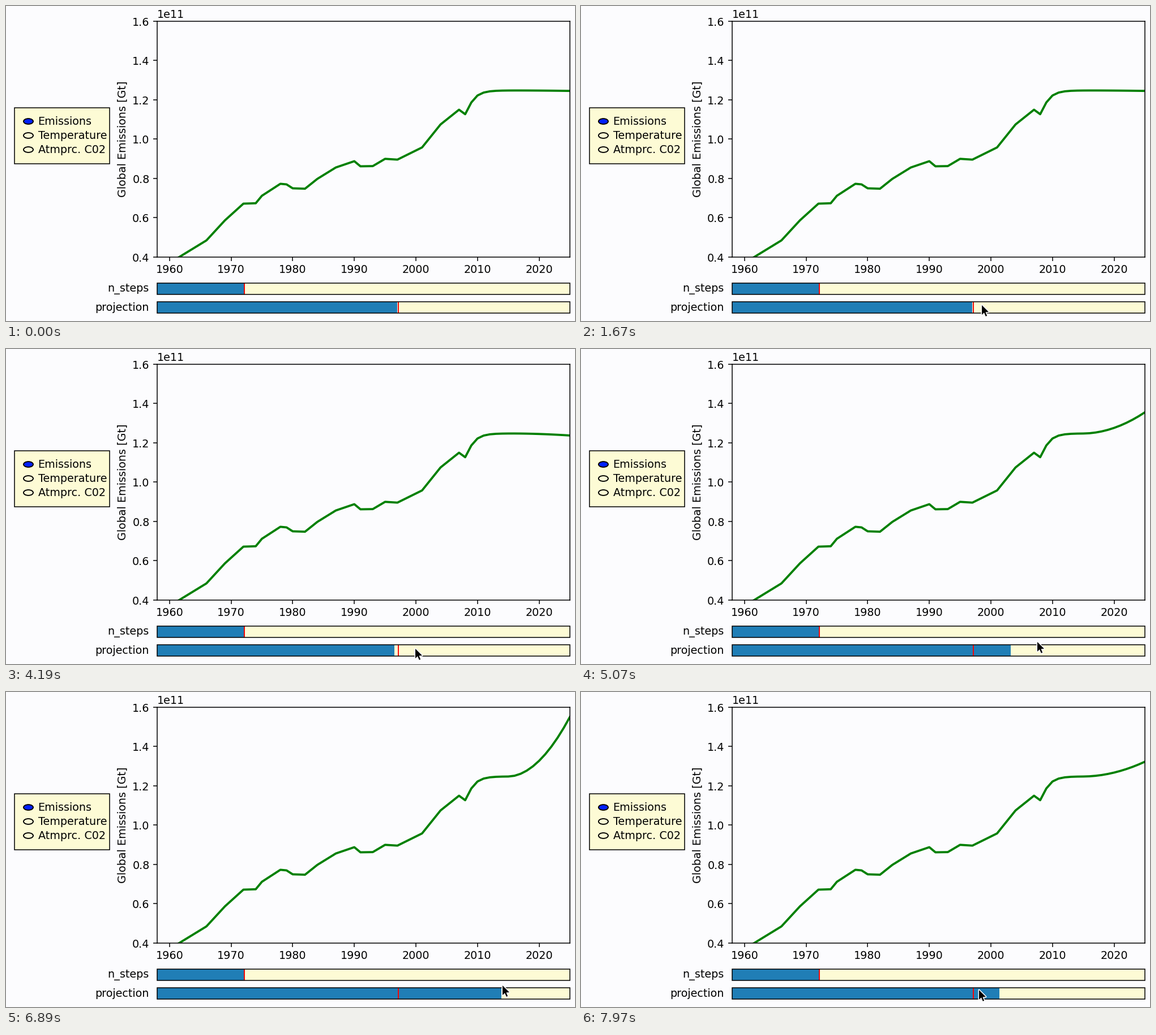
These frames come from a looping animation (1005x557 px, 7990 ms). A matplotlib script:

```python
import numpy as np
import matplotlib.pyplot as plt
from matplotlib.animation import FuncAnimation
from matplotlib.patches import Ellipse, Polygon, Rectangle

W, H, DPI = 1005, 557, 138
PX = 72 / DPI                      # points per pixel
LOOP, STEP = 7990, 34
BG, CREAM, BLUE = "#fcfcfe", "#fdfbd5", "#207eb6"
LEFT, RIGHT, TOP, BOTTOM = 267, 996, 27, 444
MARK, START_FILL, GRAB = 692.5, 691, 3400
LAG = 110                          # the bar trails the pointer
PLATEAU = 1.248

plt.rcParams.update({"font.family": "DejaVu Sans", "font.size": 10})

# turning points of the emissions, in units of 1e11
TURNS = [(1960, .37), (1966, .485), (1969, .587), (1972, .672), (1974, .674),
         (1975, .712), (1978, .773), (1979, .77), (1980, .75), (1982, .748),
         (1984, .798), (1987, .856), (1990, .888), (1991, .862), (1993, .863),
         (1995, .9), (1997, .896), (2001, .958), (2004, 1.075), (2007, 1.15),
         (2008, 1.127)]
# pointer stops: time, x, y
STOPS = [(400, 815, 562), (1670, 707, 527), (2930, 685, 530),
         (4080, 686, 531), (4190, 722, 528), (4960, 759, 519),
         (5070, 805, 516), (5400, 868, 517), (6890, 876, 517),
         (7450, 877, 530), (7970, 702, 525)]
ARROW = np.array([(0, 0), (0, 17), (4, 13.2), (6.8, 19.8),
                  (9.2, 18.8), (6.5, 12.4), (12, 12)]) + (1, 2)

YEARS = np.arange(1960, 2026)
HISTORY = np.where(YEARS < 2009, np.interp(YEARS, *zip(*TURNS)),
                   PLATEAU - 0.061 * 0.42 ** np.maximum(YEARS - 2009.0, 0))
AHEAD = np.clip((YEARS - 2015) / 10, 0, 1)


def pointer(t):
    times, xs, ys = zip(*STOPS)
    return np.array([np.interp(t, times, xs), np.interp(t, times, ys)])


def fill_end(t):
    return START_FILL if t < GRAB else pointer(t - LAG)[0]


def emissions(fill):
    """History plus a projection that bends with the slider."""
    d = fill - MARK
    rise = (0.555 * d + 0.000112 * d * d) * 1.2 / (BOTTOM - TOP)
    return (HISTORY + rise * AHEAD ** 1.93) * 1e11


def hold(t):
    """Screen updates come in a 20, 20, 100 ms rhythm."""
    phase = (t - 830) % 140
    return t - phase + min(phase // 20, 2) * 20


fig = plt.figure(figsize=((W + 1e-6) / DPI, (H + 1e-6) / DPI), dpi=DPI,
                 facecolor=BG)

ax = fig.add_axes([LEFT / W, 1 - BOTTOM / H,
                   (RIGHT - LEFT) / W, (BOTTOM - TOP) / H], facecolor=BG)
ax.set_xlim(1958, 2025)
ax.set_ylim(0.4e11, 1.6e11)
ax.set_xticks(range(1960, 2021, 10))
ax.set_yticks(np.arange(4, 17, 2) * 1e10)
ax.set_ylabel("Global Emissions [Gt]")
curve, = ax.plot(YEARS, emissions(START_FILL), color="green", lw=2)

ui = fig.add_axes([0, 0, 1, 1], zorder=5)
ui.set_xlim(0, W)
ui.set_ylim(H, 0)
ui.axis("off")


def box(x0, y0, x1, y1, z=1, **style):
    return ui.add_patch(Rectangle((x0, y0), x1 - x0, y1 - y0, zorder=z, **style))


def slider(name, y0, y1, end, mark):
    box(LEFT, y0, RIGHT, y1, fc=CREAM, ec="none")
    bar = box(LEFT, y0, end, y1, z=2, fc=BLUE, ec="none")
    ui.plot([mark, mark], [y0, y1], color="red", lw=1, zorder=3,
            solid_capstyle="butt")
    box(LEFT, y0, RIGHT, y1, z=4, fc="none", ec="black", lw=0.8)
    ui.text(252.4, (y0 + y1) / 2, name, ha="right", va="center")
    return bar


box(15, 180, 183, 279, fc=CREAM, ec="black", lw=0.8)
for i, name in enumerate(("Emissions", "Temperature", "Atmprc. C02")):
    y = 204 + 25 * i
    ui.add_patch(Ellipse((39.5, y), 17, 9.8, fc="none" if i else "#0020ff",
                         ec="black", lw=1, zorder=2))
    ui.text(56.5, y + 6, name, va="baseline")

slider("n_steps", 490, 510.5, 421, 421)
bar = slider("projection", 523, 543.5, START_FILL, MARK)

halo = ui.add_patch(Polygon(ARROW, fc="white", ec="white", lw=3 * PX,
                            joinstyle="round", zorder=8))
arrow = ui.add_patch(Polygon(ARROW, fc="black", ec="none", zorder=9))


def draw(i):
    t = hold((i + 0.7) * STEP)
    end = fill_end(t)
    curve.set_ydata(emissions(end))
    bar.set_width(end - LEFT)
    for part in (halo, arrow):
        part.set_xy(ARROW + pointer(t))
    return curve, bar, halo, arrow


anim = FuncAnimation(fig, draw, frames=LOOP // STEP, interval=STEP,
                     repeat=True, repeat_delay=0)
plt.show()
```
